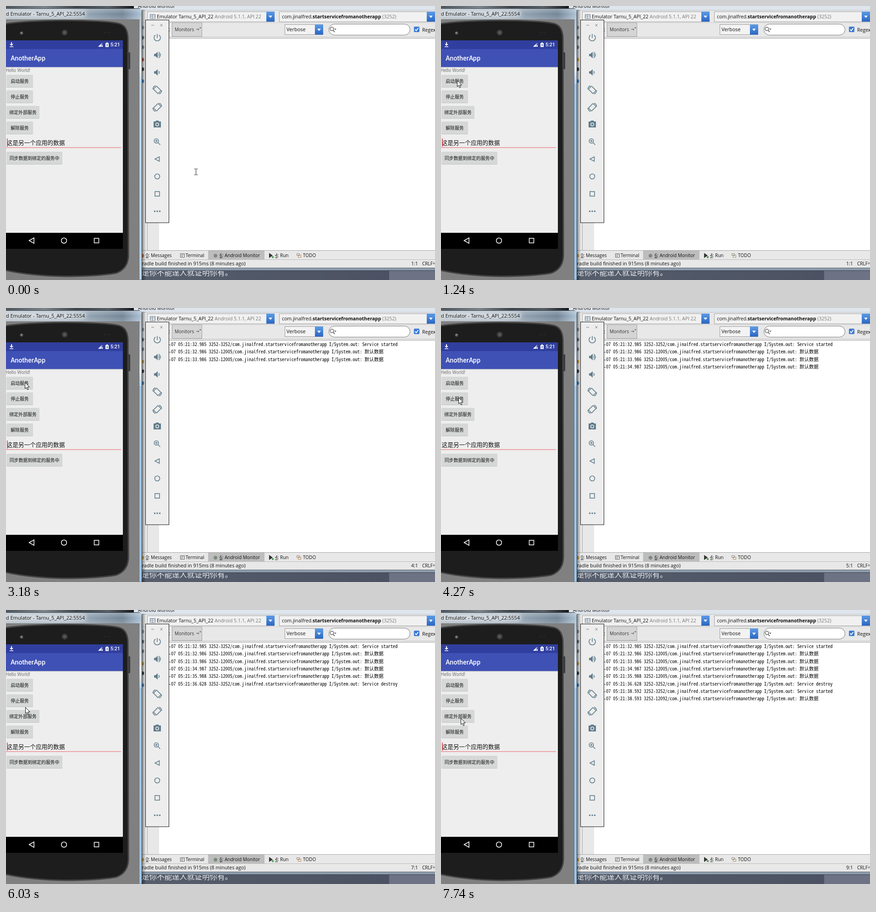
An HTML page that plays this animation: 936x598 px, repeating every 8 s.

```html
<!DOCTYPE html>
<html lang="zh-CN">
<head>
<meta charset="utf-8">
<title>Service demo</title>
<style>
html, body { margin: 0; width: 100%; height: 100%; overflow: hidden; }
svg { display: block; width: 936px; height: 598px; }
text { font-family: "Open Sans", "Noto Sans", sans-serif; font-size: 10.5px; fill: #111; }
.tab { font-size: 10px; }
.mid { text-anchor: middle; }
.app text { font-family: Roboto, "Noto Sans CJK SC", sans-serif; }
.log text { font: 10.3px "Noto Sans Mono CJK SC", "Noto Sans CJK SC", monospace; fill: #000; }
.line { fill: none; stroke: #607d8b; stroke-width: 1.6; }
.nav { fill: none; stroke: #fff; stroke-width: 1.5; }
.slate { fill: #607d8b; }
</style>
</head>
<body>
<svg viewBox="0 0 936 598">
  <defs>
    <linearGradient id="photo">
      <stop offset="0" stop-color="#4b545c"/><stop offset=".3" stop-color="#7b848b"/>
      <stop offset=".55" stop-color="#3b4248"/><stop offset=".8" stop-color="#596169"/><stop offset="1" stop-color="#15181b"/>
    </linearGradient>
    <linearGradient id="title">
      <stop offset="0" stop-color="#a9b5c0"/><stop offset=".45" stop-color="#a3b1be"/>
      <stop offset=".64" stop-color="#8799a9"/><stop offset=".86" stop-color="#6d8092"/><stop offset="1" stop-color="#a9c0d4"/>
    </linearGradient>
    <linearGradient id="shine" x2="0" y2="1">
      <stop offset="0" stop-color="#fff" stop-opacity=".3"/><stop offset=".5" stop-color="#fff" stop-opacity=".05"/>
      <stop offset="1" stop-color="#fff" stop-opacity=".2"/>
    </linearGradient>
    <linearGradient id="edge" x2="0" y2="1">
      <stop offset="0" stop-color="#a5b6c5"/><stop offset=".22" stop-color="#e6eff7"/>
      <stop offset=".27" stop-color="#b9d5ee"/><stop offset="1" stop-color="#b5d2ec"/>
    </linearGradient>
    <linearGradient id="shade">
      <stop offset="0" stop-opacity=".4"/><stop offset="1" stop-opacity="0"/>
    </linearGradient>
    <linearGradient id="blue" x2="0" y2="1">
      <stop offset="0" stop-color="#5d9ce6"/><stop offset="1" stop-color="#2a66c4"/>
    </linearGradient>
    <linearGradient id="desk">
      <stop offset="0" stop-color="#5f6673"/><stop offset=".6" stop-color="#505766"/><stop offset="1" stop-color="#4a5061"/>
    </linearGradient>
    <filter id="soft" x="-20%" y="-80%" width="140%" height="260%"><feGaussianBlur stdDeviation="5"/></filter>
    <g id="drop"><rect width="18" height="22" fill="url(#blue)"/><path d="M5 9h8l-4 5z" fill="#fff"/></g>
    <g id="rotate" class="line">
      <rect x="-4.800" y="-7" width="9.600" height="14" rx="1" transform="rotate(-45)"/>
      <path d="M-9.500-1Q-9.500-7-4-9M9.500 1Q9.500 7 4 9"/>
    </g>
    <path id="speaker" class="slate" d="M-7-2.500h3l5-4.500v14l-5-4.500h-3z"/>
  </defs>

  <!-- IDE window -->
  <rect width="936" height="598" fill="#e8e8e8"/>
  <rect x="279" width="657" height="10" fill="#dfe5ec"/>
  <text x="288" y="4">Android Monitor</text>
  <path d="M279 9.5H936" stroke="#b9c0c8"/>
  <rect x="308.5" y="12.5" width="277" height="22" fill="#f1f1f1" stroke="#a3a3a3"/>
  <use href="#drop" x="568" y="12"/>
  <g fill="#fff" stroke="#66788a"><rect x="314.5" y="18.5" width="11" height="9"/><path d="M319.5 18v10M321 21h4M321 24h4M315 21h4M315 24h4"/></g>
  <text x="329" y="27">Emulator Tarnu_5_API_22 <tspan fill="#777">Android 5.1.1, API 22</tspan></text>
  <rect x="596.5" y="12.5" width="340" height="22" fill="#f1f1f1" stroke="#a3a3a3"/>
  <use href="#drop" x="918" y="12"/>
  <text x="602" y="27">com.jinalfred.<tspan font-weight="700">startservicefromanotherapp</tspan> <tspan fill="#777">(3252)</tspan></text>
  <path d="M297 36.5H936" stroke="#d0d0d0"/>
  <rect x="362.5" y="36.5" width="65" height="30" fill="#d5d5d5" stroke="#a2a2a2"/>
  <text x="354" y="55">t</text>
  <text x="368" y="55" class="tab" style="fill:#333">Monitors</text>
  <path d="M415 51h6M419 49l2 2-2 2M424 46v3M422.5 47.5h3" fill="none" stroke="#555"/>
  <rect x="608.5" y="40.5" width="83" height="22" fill="#f3f3f3" stroke="#999"/>
  <use href="#drop" x="674" y="40.5"/>
  <text x="612" y="55" style="font-size:11px">Verbose</text>
  <rect x="704.5" y="39.5" width="177" height="24" rx="12" fill="#fff" stroke="#777"/>
  <circle cx="711" cy="50" r="3.8" fill="none" stroke="#666" stroke-width="1.5"/>
  <path d="M714 53l3 4" stroke="#666" stroke-width="1.8"/><path d="M716 49.5h5l-2.5 3z" fill="#666"/>
  <rect x="890" y="45" width="12" height="12" rx="2" fill="#3b7bd6"/>
  <path d="M892.5 51l2.5 3 4.5-6" fill="none" stroke="#fff" stroke-width="1.8"/>
  <text x="908" y="56">Regex</text>
  <path d="M297 67.5H936" stroke="#c6c6c6"/>
  <rect x="334" y="71" width="602" height="462" fill="#fff"/>
  <path d="M309 70.5H936M308.5 70V533" stroke="#a6a6a6"/>
  <g class="log"></g>
  <path d="M297 533.5H936" stroke="#a6a6a6"/>
  <rect x="441" y="534" width="123" height="19" fill="#bdbdbd"/>
  <text x="305" y="548" class="tab"><tspan text-decoration="underline">0</tspan>: Messages</text>
  <text x="392" y="548" class="tab">Terminal</text>
  <text x="466" y="548" class="tab"><tspan text-decoration="underline">6</tspan>: Android Monitor</text>
  <text x="587" y="548" class="tab"><tspan text-decoration="underline">4</tspan>: Run</text>
  <text x="648" y="548" class="tab">TODO</text>
  <g fill="none" stroke="#666">
    <path d="M380.5 540.5h9v8h-9zM382 543h6M382 546h4"/>
    <path d="M634.5 540.5h6v4h-6z" stroke="#8a8a8a"/><path d="M637.5 543.5h6v5h-6z" stroke="#b98a4a"/>
  </g>
  <circle cx="457" cy="545" r="4" fill="#7d8a7d"/>
  <path d="M574 539l8 5.5-8 5.5z" fill="#333"/><rect x="580" y="546" width="4" height="4" fill="#57a05a"/>
  <path d="M297 553.5H936" stroke="#bcbcbc"/>
  <text x="289" y="566" style="font-size:10.8px">Gradle build finished in 915ms (8 minutes ago)</text>
  <text id="pos" x="884" y="566"></text>
  <text x="908" y="566" style="font-size:10px">CRLF÷</text>
  <rect y="571" width="936" height="27" fill="url(#desk)"/>
  <rect x="836" y="577" width="100" height="21" fill="#6d7284"/>
  <text x="296" y="588" style="font:16.5px 'Noto Sans CJK SC',sans-serif;fill:#e8ebef">是你不能達人就证明你有。</text>
  <rect x="290" y="572" width="646" height="5" fill="#8c9baa"/>
  <path d="M290 571.5H936" stroke="#6a7580"/><path d="M290 577.5H936" stroke="#3a4150"/>
  <g id="strip"></g>
  <rect x="297" y="8" width="8" height="590" fill="url(#shade)"/>

  <!-- emulator window -->
  <rect width="279" height="6" fill="url(#photo)"/>
  <path d="M0 5.5H290Q296.5 6 296.5 12V598H0z" fill="url(#edge)" stroke="#2c343c"/>
  <rect y="6" width="296" height="23" fill="url(#title)"/>
  <rect y="6" width="296" height="23" fill="url(#shine)"/>
  <rect x="-10" y="11" width="184" height="12" fill="#fff" opacity=".6" filter="url(#soft)"/>
  <rect id="focus" x="291" y="170" width="5" height="428" fill="#79b4e8" opacity=".45"/>
  <text x="0" y="21" style="font-size:10.9px">d Emulator - Tarnu_5_API_22:5554</text>
  <rect y="29" width="291" height="569" fill="#808080"/>
  <path d="M290.5 29V598" stroke="#6b747c"/>
  <rect x="265" y="101" width="6" height="37" rx="2" fill="#3a3a40"/>
  <path d="M-30 46Q0 33 128 31.5Q215 32 245 38Q265 42 266 70L267 545Q266 574 240 583Q200 590 128 590Q30 588-30 569z" fill="#1d1d1d" stroke="#434343" stroke-width="3"/>
  <circle cx="128" cy="58" r="6.5" fill="#3a3a3a"/><circle cx="128" cy="58" r="3.5" fill="#565656"/>
  <circle cx="34" cy="59" r="3.5" fill="#555"/><circle cx="33.5" cy="58.5" r="1.5" fill="#999"/>
  <circle cx="217" cy="58" r="2" fill="#2a2528"/><circle cx="225" cy="58" r="2" fill="#2a2528"/>
  <g class="app">
    <rect y="75" width="255" height="455" fill="#eee"/>
    <rect y="75" width="255" height="19" fill="#303f9f"/>
    <rect y="94" width="255" height="39" fill="#3f51b5"/>
    <rect y="133" width="255" height="1" fill="#b5b8c6"/><rect y="134" width="255" height="1" fill="#dcdde2"/>
    <path d="M11 79h2v4h3l-4 4-4-4h3zM8 88h8v1.500H8z" fill="#fff"/>
    <path d="M201 89l9-9v9z" fill="#fff" opacity=".55"/><path d="M201 89l6-6v6zM209 86h2v3h-2z" fill="#fff"/>
    <path d="M217 81h2v-1.500h3V81h2v8.500h-7z" fill="#fff"/><path d="M221 82l-2 4h1.500v2.500l2-4H221z" fill="#303f9f"/>
    <text x="228" y="88" style="fill:#fff;font-size:10.5px;font-weight:500">5:21</text>
    <text x="10" y="119" style="fill:#fff;font-size:14.3px;font-weight:500">AnotherApp</text>
    <text x="-1" y="144" style="fill:#757575;font-size:10px">Hello World!</text>
    <g id="buttons"></g>
    <text x="1.5" y="303" style="font-size:12.7px;fill:#111">这是另一个应用的数据</text>
    <rect y="308.5" width="251" height="1" fill="#ee5a60"/>
    <rect id="caret" x="2" y="289" width="2" height="18" fill="#e5484f" opacity=".8"/>
    <rect y="495" width="255" height="35" fill="#000"/>
    <path class="nav" d="M50.5 512l10.5-6v12z"/><circle class="nav" cx="126.5" cy="512" r="5.8"/>
    <rect class="nav" x="192.5" y="507" width="10" height="10"/>
  </g>

  <!-- emulator controls -->
  <rect x="304.5" y="30.5" width="51" height="442.5" fill="#ededed" stroke="#111"/>
  <path d="M317 42h6M336.5 39.5l5 5m0-5l-5 5" stroke="#777"/>
  <path class="line" d="M326 63.5A7 7 0 1 0 334 63.5M330 61V70"/>
  <g transform="translate(330 107)"><use href="#speaker"/><path class="line" d="M3-3q2.5 3 0 6M3-6.5q8 6.5 0 13"/></g>
  <g transform="translate(330 145)"><use href="#speaker"/><path class="line" d="M3-3q2.5 3 0 6"/></g>
  <use href="#rotate" x="330" y="183"/>
  <use href="#rotate" transform="translate(330 221) scale(-1 1)"/>
  <path class="slate" d="M322 252h4l1.5-2h5l1.5 2h4v13h-16z"/>
  <circle cx="330" cy="258.5" r="3.2" fill="none" stroke="#ededed" stroke-width="1.5"/>
  <circle class="line" cx="328" cy="294.5" r="4.7"/><path class="line" d="M331.5 298l5 5M325.5 294.5h5M328 292v5"/>
  <path class="line" d="M325 334l9.5-5v10z"/>
  <circle class="line" cx="330" cy="372" r="5.5"/>
  <rect class="line" x="325" y="405" width="10" height="10"/>
  <g class="slate"><circle cx="324.5" cy="448" r="1.8"/><circle cx="330" cy="448" r="1.8"/><circle cx="335.5" cy="448" r="1.8"/></g>

  <path id="beam" d="M411 355.5h3M415 355.5h3M414.5 356v12M411 368.5h3M415 368.5h3" stroke="#222" fill="none"/>
  <path id="arrow" d="M.5 .5V14L3.6 11.2 5.7 16.3 7.9 15.4 5.8 10.5H10.2z" fill="#fff" stroke="#111"/>
</svg>
<script>
const $ = s => document.querySelector(s);
const LOOP = 8000;

// label, vertical centre, width
$('#buttons').innerHTML = [
  ['启动服务', 163, 58], ['停止服务', 197, 58], ['绑定外部服务', 231, 72],
  ['解除服务', 265, 58], ['同步数据到绑定的服务中', 331, 122]
].map(([label, y, w]) => `
  <rect x="1" y="${y - 12}" width="${w}" height="27" rx="2" fill="#c3c4c4"/>
  <rect x="1" y="${y - 13}" width="${w}" height="27" rx="2" fill="#d6d7d7"/>
  <text class="mid" x="${1 + w / 2}" y="${y + 4.5}" style="font-size:9.9px">${label}</text>`).join('');

// appearance time, clock, thread, message
const logs = [
  [1650, '32.985', 3252, 'Service started'], [1650, '32.986', 12005, '默认数据'],
  [2630, '33.986', 12005, '默认数据'], [3640, '34.987', 12005, '默认数据'],
  [4650, '35.988', 12005, '默认数据'], [5290, '36.628', 3252, 'Service destroy'],
  [7280, '38.592', 3252, 'Service started'], [7280, '38.593', 12092, '默认数据']
];
$('.log').innerHTML = logs.map(([, clock, thread, msg], i) =>
  `<text x="355" y="${83 + 16.33 * i}">-07 05:21:${clock} 3252-${thread}/com.jinalfred.startservicefromanotherapp I/System.out: ${msg}</text>`).join('');
const rows = [...$('.log').children];

// half-hidden tool icons beside the emulator
$('#strip').innerHTML = [47, 69, 90, 117, 138, 164, 545].map((y, i) =>
  `<circle cx="297.5" cy="${y}" r="4" fill="${['#999', '#777', '#888', '#c8594a', '#444', '#4a8fd0', '#d9793f'][i]}"/>`).join('');
const accents = [3, 6].map(i => $('#strip').children[i]);

// pointer stops: time, x, y
const path = [
  [0, 414, 362], [60, 414, 362], [700, 42, 172], [860, 35, 162], [2479, 35, 162], [2480, 41, 162],
  [3180, 41, 162], [3640, 38, 195], [5960, 38, 195], [6030, 42, 212], [6340, 43, 236], [LOOP, 43, 236]
];
function pointer(t) {
  const i = path.findIndex(p => p[0] > t);
  const [t0, x0, y0] = path[i - 1], [t1, x1, y1] = path[i];
  const u = (t - t0) / (t1 - t0), k = u * (2 - u);
  return [x0 + (x1 - x0) * k, y0 + (y1 - y0) * k].map(Math.round);
}

const show = (el, on) => el.setAttribute('visibility', on ? 'visible' : 'hidden');

function draw(now) {
  const t = now % LOOP;
  const moving = t >= 100;
  const [x, y] = pointer(t);
  show($('#beam'), !moving);
  show($('#arrow'), moving);
  $('#arrow').setAttribute('transform', `translate(${x} ${y})`);
  show($('#caret'), (t + 164) % 988 < 480);
  show($('#focus'), t >= 1010);
  accents.forEach((el, i) => el.setAttribute('fill', t < 1010 ? ['#c8594a', '#d9793f'][i] : '#d9a441'));
  rows.forEach((row, i) => show(row, t >= logs[i][0]));
  $('#pos').textContent = `${logs.filter(l => t >= l[0]).length + 1}:1`;
  requestAnimationFrame(draw);
}
draw(0);
</script>
</body>
</html>
```
